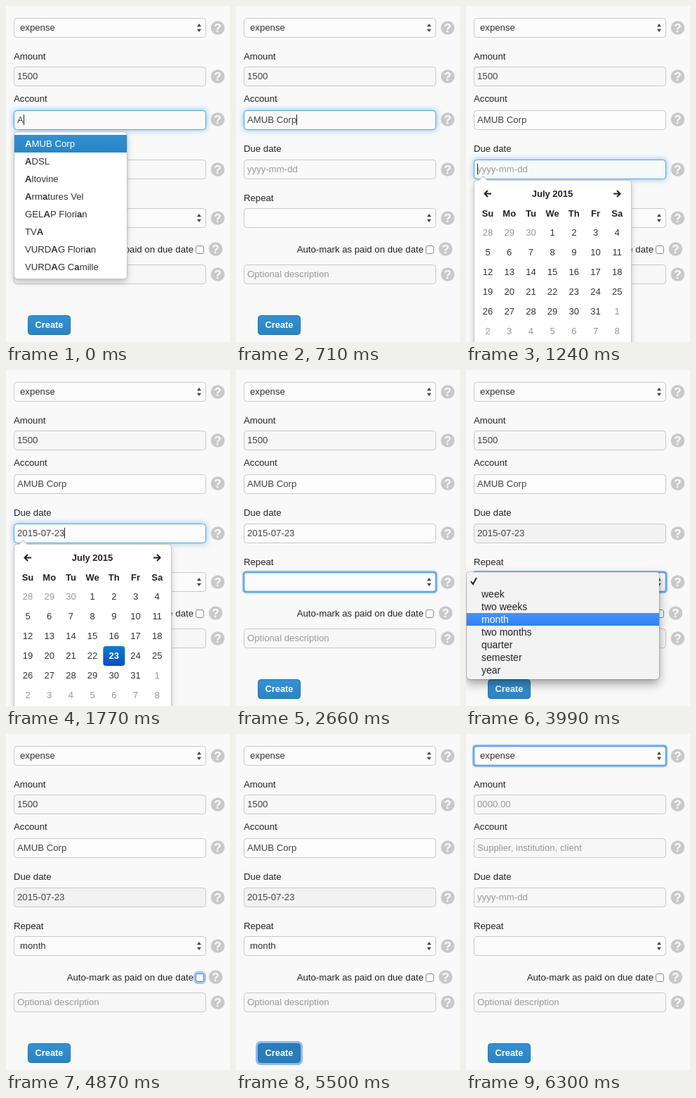
An HTML page with a canvas for the animation above (8.72 s loop, 319 by 477 pixels).

```html
<!DOCTYPE html>
<html lang="en">
<head>
<meta charset="utf-8">
<title>New expense form</title>
<style>
  html, body { margin: 0; width: 100%; height: 100%; overflow: hidden; background: #f9f9f9; }
  canvas { display: block; }
</style>
</head>
<body>
<canvas id="stage" width="319" height="477"></canvas>
<script>
const ctx = document.getElementById('stage').getContext('2d');
const LOOP = 8720;
const FAMILY = '"Liberation Sans", Arial, sans-serif';
const COMPANY = 'AMUB Corp';
const ACCOUNTS = [COMPANY, 'ADSL', 'Altovine', 'Armatures Vel', 'GELAP Florian',
  'TVA', 'VURDAG Florian', 'VURDAG Camille'];
const PERIODS = ['', 'week', 'two weeks', 'month', 'two months', 'quarter', 'semester', 'year'];
const WEEKDAYS = ['Su', 'Mo', 'Tu', 'We', 'Th', 'Fr', 'Sa'];
const TOP = { type: 17, amount: 86, account: 148, due: 218, repeat: 287, note: 367 };

// Value of the last [time, value] step that has been reached.
const at = (t, steps) => steps.reduce((v, [start, next]) => t >= start ? next : v, steps[0][1]);

function text(str, x, y, { color = '#222', size = 13.2, bold = false, align = 'left' } = {}) {
  ctx.font = `${bold ? 'bold ' : ''}${size}px ${FAMILY}`;
  ctx.fillStyle = color;
  ctx.textAlign = align;
  ctx.fillText(str, x, y);
  return ctx.measureText(str).width;
}

function box(x, y, w, h, r, { fill, stroke, line = 1 }) {
  ctx.beginPath();
  ctx.roundRect(x, y, w, h, r);
  if (fill) { ctx.fillStyle = fill; ctx.fill(); }
  if (stroke) { ctx.strokeStyle = stroke; ctx.lineWidth = line; ctx.stroke(); }
}

function shadowed(color, blur, dy, draw) {
  ctx.save();
  ctx.shadowColor = color;
  ctx.shadowBlur = blur;
  ctx.shadowOffsetY = dy;
  draw();
  ctx.restore();
}

function vertical(y0, y1, from, to) {
  const g = ctx.createLinearGradient(0, y0, 0, y1);
  g.addColorStop(0, from);
  g.addColorStop(1, to);
  return g;
}

function polygon(points, color) {
  ctx.beginPath();
  points.forEach(([x, y]) => ctx.lineTo(x, y));
  ctx.fillStyle = color;
  ctx.fill();
}

function help(x, y) {
  ctx.beginPath();
  ctx.arc(x, y, 9.8, 0, Math.PI * 2);
  ctx.fillStyle = '#c9c9c9';
  ctx.fill();
  text('?', x, y + 6, { color: '#fff', size: 17, bold: true, align: 'center' });
}

function input(y, value, hint, { glow = 0, fill = '#f7f7f7' } = {}) {
  if (glow) {
    shadowed(`rgba(82,168,236,${0.75 * glow})`, 8, 0,
      () => box(11, y, 274, 28, 4, { fill }));
  }
  box(11.5, y + 0.5, 273, 27, 4, { fill, stroke: '#c8c8c8' });
  if (glow) box(11.5, y + 0.5, 273, 27, 4, { stroke: `rgba(82,168,236,${glow})` });
  const width = value ? text(value, 16, y + 18, { color: '#444' }) : 0;
  if (!value) text(hint, 16, y + 18, { color: '#999' });
  if (glow === 1) {
    ctx.fillStyle = '#222';
    ctx.fillRect(Math.round(16 + width), y + 6, 1, 15);
  }
}

function select(y, value, focused) {
  box(11.5, y + 0.5, 273, 27, 4, { fill: '#fbfbfb', stroke: '#c8c8c8' });
  if (focused) {
    box(10.5, y - 0.5, 275, 29, 4, { stroke: 'rgba(110,170,240,.4)', line: 4 });
    box(11, y, 274, 28, 3, { stroke: '#66a7ec', line: 2.4 });
  }
  text(value, 20, y + 18, { color: '#333' });
  const c = y + 14;
  polygon([[272, c - 1.7], [275, c - 6], [278, c - 1.7]], '#444');
  polygon([[272, c + 1.7], [275, c + 6], [278, c + 1.7]], '#444');
}

function checkbox(focused) {
  if (focused) box(269, 339, 14, 14, 4, { stroke: '#a3c8f6', line: 4 });
  box(270.5, 340.5, 11, 11, 2.5, { fill: '#fff', stroke: focused ? '#4d83c4' : '#8a8a8a' });
}

function button(state) {
  ctx.save();
  if (state === 'focus') box(30, 438, 63, 30, 5, { stroke: '#8cbcf0', line: 4 });
  if (state === 'busy') ctx.globalAlpha = 0.65;
  box(31.5, 439.5, 60, 27, 4, {
    fill: state === 'focus' ? '#2a7db8' : vertical(439, 467, '#3691d1', '#2a84c3'),
    stroke: '#2573a9'
  });
  text('Create', 61.5, 457, { color: '#fff', size: 12.8, bold: true, align: 'center' });
  ctx.restore();
}

function suggestions(items) {
  const h = items.length * 25 + 10;
  shadowed('rgba(0,0,0,.25)', 9, 4, () => box(11.5, 178.5, 161, h - 1, 5, { fill: '#fff' }));
  box(11.5, 178.5, 161, h - 1, 5, { stroke: '#c4c4c4' });
  ctx.fillStyle = vertical(183, 208, '#3190d1', '#2a85c4');
  ctx.fillRect(12, 183, 160, 25);
  return (query) => items.forEach((item, i) => {
    let x = 27;
    for (const part of item.split(new RegExp(`(${query})`, 'i' + 'g'))) {
      const bold = part.toLowerCase() === query.toLowerCase();
      x += text(part, x, 200 + i * 25, { color: i ? '#333' : '#fff', bold });
    }
  });
}

function arrow(x, y, dir) {
  ctx.beginPath();
  ctx.moveTo(x - 5 * dir, y);
  ctx.lineTo(x + 4 * dir, y);
  ctx.moveTo(x, y - 4.5);
  ctx.lineTo(x + 4.5 * dir, y);
  ctx.lineTo(x, y + 4.5);
  ctx.strokeStyle = '#222';
  ctx.lineWidth = 2;
  ctx.stroke();
}

function calendar(chosen) {
  shadowed('rgba(0,0,0,.22)', 9, 4, () => box(11.5, 247.5, 224, 260, 4, { fill: '#fff' }));
  box(11.5, 247.5, 224, 260, 4, { stroke: '#c2c2c2' });
  polygon([[17, 248], [24.5, 241], [32, 248]], '#c2c2c2');
  polygon([[18, 248.5], [24.5, 242.4], [31, 248.5]], '#fff');
  arrow(31, 266.5, -1);
  arrow(215, 266.5, 1);
  text('July 2015', 123, 271, { size: 13, bold: true, align: 'center' });
  const column = i => 31 + i * 30.7;
  WEEKDAYS.forEach((d, i) => text(d, column(i), 299, { size: 13, bold: true, align: 'center' }));
  for (let i = 0; i < 42; i++) {
    const day = new Date(2015, 5, 28 + i);
    const x = column(i % 7), y = 308 + Math.floor(i / 7) * 28;
    const inMonth = day.getMonth() === 6;
    const on = inMonth && day.getDate() === chosen;
    if (on) box(x - 15.5, y, 31, 28, 4, { fill: vertical(y, y + 28, '#0f7fcd', '#0a4cc2') });
    text(day.getDate(), x, y + 18, {
      size: 13, bold: on, align: 'center', color: on ? '#fff' : inMonth ? '#333' : '#999'
    });
  }
}

function periodMenu(active, alpha) {
  ctx.save();
  ctx.globalAlpha = alpha;
  shadowed('rgba(0,0,0,.38)', 14, 6, () => box(1, 287, 274, 152, [4, 4, 5, 5], { fill: '#f3f3f3' }));
  box(0.5, 286.5, 275, 153, [4, 4, 5, 5], { stroke: 'rgba(0,0,0,.16)' });
  if (active >= 0) {
    ctx.fillStyle = vertical(291 + active * 18, 309 + active * 18, '#4593fa', '#2f80f4');
    ctx.fillRect(1, 291 + active * 18, 274, 18);
  }
  PERIODS.forEach((p, i) =>
    text(p, 22, 304 + i * 18 + 0.5, { size: 14, color: i === active ? '#fff' : '#222' }));
  ctx.beginPath();
  ctx.moveTo(7, 300);
  ctx.lineTo(10, 304);
  ctx.lineTo(15, 295);
  ctx.strokeStyle = active === 0 ? '#fff' : '#222';
  ctx.lineWidth = 2;
  ctx.stroke();
  ctx.restore();
}

function draw(t) {
  const done = t >= 6300;
  const within = (a, b) => t >= a && t < b;

  ctx.fillStyle = '#f9f9f9';
  ctx.fillRect(0, 0, 319, 477);

  text('Amount', 11, 76);
  text('Account', 11, 136);
  text('Due date', 11, 207);
  text('Repeat', 11, 277);
  text('Auto-mark as paid on due date', 267, 350, { align: 'right' });

  const query = at(t, [[0, 'A'], [90, 'AM']]);
  const account = at(t, [[0, query], [710, COMPANY], [6300, '']]);
  const chosen = at(t, [[0, 0], [1500, 16], [1770, 23], [6300, 0]]);

  select(TOP.type, 'expense', done);
  input(TOP.amount, done ? '' : '1500', '0000.00');
  input(TOP.account, account, 'Supplier, institution, client', {
    glow: at(t, [[0, 1], [1150, 0.5], [1240, 0]]),
    fill: at(t, [[0, '#fafafa'], [1150, '#fdfdfd'], [6300, '#f7f7f7']])
  });
  input(TOP.due, chosen ? `2015-07-${chosen}` : '', 'yyyy-mm-dd', {
    glow: at(t, [[0, 0], [1150, 0.5], [1240, 1], [2480, 0.5], [2570, 0]]),
    fill: at(t, [[0, '#f9f9f9'], [1330, '#fcfcfc'], [2750, '#f2f2f2'], [6300, '#f7f7f7']])
  });
  select(TOP.repeat, within(4520, 6300) ? 'month' : '', within(2480, 4870));
  checkbox(within(4870, 5140));
  input(TOP.note, '', 'Optional description', {
    glow: at(t, [[0, 0], [5140, 0.5], [5230, 1], [5410, 0.5], [5500, 0]])
  });
  button(at(t, [[0, ''], [5410, 'focus'], [6030, 'busy'], [6300, '']]));

  Object.values(TOP).forEach(y => help(301.5, y + (y === TOP.account ? 13 : 14)));
  help(298.5, 345);

  if (t < 710) suggestions(t < 170 ? ACCOUNTS : [COMPANY])(t < 170 ? 'A' : query);
  if (within(1240, 2220)) calendar(chosen);
  if (within(2750, 4610)) {
    const active = at(t, [[2750, 0], [2920, 1], [3100, 2], [3270, 3], [3630, 4],
      [3990, 3], [4350, -1], [4520, 3]]);
    periodMenu(active, t < 4520 ? 1 : 0.5);
  }
}

const start = performance.now();
function tick() {
  draw((performance.now() - start) % LOOP);
  requestAnimationFrame(tick);
}
tick();
</script>
</body>
</html>
```
